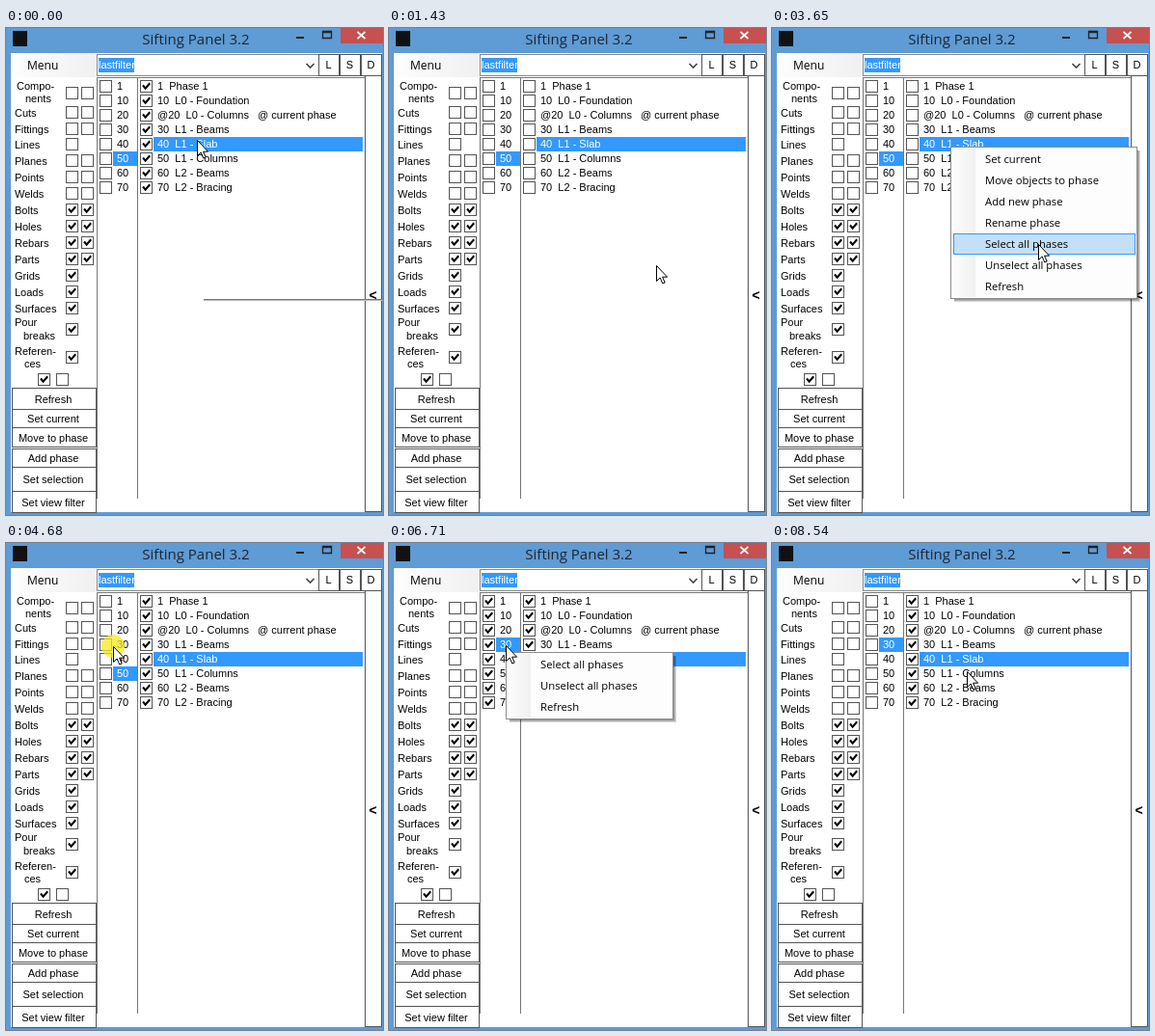
Write an HTML page that moves like this. It is 391 by 505 pixels and loops after 8.74 s.

```html
<!DOCTYPE html>
<html>
<head>
<meta charset="utf-8">
<style>
  html, body { margin: 0; width: 100%; height: 100%; overflow: hidden; background: #5f9bd4; }
  svg { display: block; }
  text { font: 11px "Liberation Sans", Arial, sans-serif; white-space: pre; }
  .ui { font: 11.3px "Open Sans", sans-serif; }
  .title { font: 15px "Open Sans", sans-serif; }
  .bold { font-weight: bold; font-size: 14px; }
  .mid { text-anchor: middle; }
  rect { shape-rendering: crispEdges; }
</style>
</head>
<body>
<svg width="391" height="505" viewBox="0 0 391 505"></svg>
<script>
const LOOP = 8740, STEPS = 43;
const BLUE = '#3399ff', LINE = '#555';
const svg = document.querySelector('svg');

const rect = (x, y, w, h, fill) => `<rect x="${x}" y="${y}" width="${w}" height="${h}" fill="${fill}"/>`;
const frame = (x, y, w, h, stroke = LINE, fill = '#fff') =>
  rect(x, y, w, h, stroke) + rect(x + 1, y + 1, w - 2, h - 2, fill);
const text = (x, y, s, cls = '', fill = '#000') => `<text x="${x}" y="${y}" class="${cls}" fill="${fill}">${s}</text>`;
const path = (d, stroke, width, fill = 'none') =>
  `<path d="${d}" stroke="${stroke}" stroke-width="${width}" fill="${fill}"/>`;
const check = (x, y, on) => frame(x, y, 13, 13) +
  (on ? path(`M${x + 3} ${y + 5.5}l2.6 3.2 4.6-5.4`, '#000', 2.1) : '');
const shade = `<defs><linearGradient id="shade"><stop stop-color="#fdfdfd"/>
  <stop offset="1" stop-color="#f0f0f0"/></linearGradient></defs>`;

const phases = ['1  Phase 1', '10  L0 - Foundation', '@20  L0 - Columns   @ current phase', '30  L1 - Beams',
  '40  L1 - Slab', '50  L1 - Columns', '60  L2 - Beams', '70  L2 - Bracing'];
const commands = ['Set current', 'Move objects to phase', 'Add new phase', 'Rename phase',
  'Select all phases', 'Unselect all phases', 'Refresh'];
const kinds = ['Cuts', 'Fittings', 'Lines', 'Planes', 'Points', 'Welds', 'Bolts', 'Holes', 'Rebars', 'Parts',
  'Grids', 'Loads', 'Surfaces'];
const buttons = [['Refresh', 373, 23], ['Set current', 395, 20], ['Move to phase', 414, 21],
  ['Add phase', 436, 20], ['Set selection', 455, 26], ['Set view filter', 480, 23]];

// Pointer positions: step, x, y
const pointer = [[0, 198, 116], [1, 198, 116], [5, 277, 246], [7, 277, 246], [11, 185, 116], [12, 185, 116],
  [14, 233, 157], [17, 276, 224], [18, 276, 224], [22, 114, 110], [23, 111, 107], [24, 111, 107],
  [26, 138, 137], [28, 138, 137], [31, 121, 106], [34, 121, 106], [37, 176, 146], [40, 176, 146], [42, 202, 133]];

// Context menus: first step, last step, x, y, width, item count
const menus = [[1, 6, 198, 123, 194, 7], [12, 17, 185, 123, 194, 7], [24, 27, 111, 115, 174, 3], [32, 38, 121, 113, 174, 3]];

const within = (k, a, b) => k >= a && k <= b;

function pointerAt(k) {
  const i = Math.max(1, pointer.findIndex(p => p[0] >= k));
  const [a, ax, ay] = pointer[i - 1], [b, bx, by] = pointer[i];
  const f = (k - a) / (b - a);
  return [Math.round(ax + (bx - ax) * f), Math.round(ay + (by - ay) * f)];
}

function drawWindow() {
  let s = shade + rect(0, 0, 391, 505, '#5f9bd4') + rect(7, 3, 15, 16, '#111');
  s += text(197, 17, 'Sifting Panel 3.2', 'title mid', '#1c2630');
  s += rect(301, 9, 8, 2, '#222') + path('M328.5 3.5h9v7h-9zM328 4.5h10', '#222', 1.3);
  s += rect(347, 0, 44, 16, '#c75050') + path('M364.5 4l8 7m0-7l-8 7', '#fff', 1.7);
  s += rect(5, 26, 385, 476, '#fff') + rect(6, 26, 88, 25, 'url(#shade)');
  s += text(22, 43, 'Menu', 'ui').replace('<text', '<text style="font-size:12px"');
  s += frame(94, 27, 231, 23, '#888') + rect(96, 31, 37, 15, BLUE) + text(96, 42, 'lastfilter', '', '#fff');
  s += path('M311.5 37l4 4 4-4', '#444', 1.6);
  [...'LSD'].forEach((c, i) => s += frame(324 + 22 * i, 27, 22, 23) + text(334.5 + 22 * i, 42, c, 'mid'));
  s += rect(94, 51, 278, 1, '#777');
  s += rect(94, 51, 1, 437, '#777') + rect(136, 51, 1, 437, '#777');
  s += frame(372, 49, 18, 453);
  return s + text(380.5, 282, '&lt;', 'bold mid');
}

function drawKinds() {
  let s = text(11, 64, 'Compo-') + text(20, 77, 'nents') + check(62, 61) + check(78, 61);
  kinds.forEach((name, i) => {
    const y = Math.floor(81.1 + 16.92 * i);
    s += text(9, y + 11, name) + check(62, y, i > 5);
    if (i < 10 && i !== 2) s += check(78, y, i > 5);
  });
  s += text(9, 309, 'Pour') + text(18, 323, 'breaks') + check(62, 306, true);
  s += text(9, 339, 'Referen-') + text(19, 352, 'ces') + check(62, 335, true);
  s += check(33, 358, true) + check(52, 358);
  for (const [name, y, h] of buttons) s += frame(6, y, 88, h) + text(49, Math.round(y + h / 2) + 4, name, 'mid');
  return s;
}

function drawPhases(k) {
  const selected = k < 24 ? 5 : 3;
  let s = rect(111, 53 + 15 * selected, 25, 15, BLUE) + rect(153, 113, 217, 15, BLUE);
  phases.forEach((name, i) => {
    const y = 64 + 15 * i;
    s += check(97, y - 10, within(k, 28, 38)) + check(139, y - 10, !within(k, 7, 17));
    s += text(115, y, i ? i * 10 : 1, '', i === selected ? '#fff' : '#000');
    s += text(157, y, name, '', i === 4 ? '#fff' : '#000');
  });
  return s;
}

function drawMenu([, , x, y, w, count], px, py) {
  const h = 22 * count + 4;
  let s = [3, 2, 1].map(d => rect(x + 4, y + 4, w - 4 + d, h - 4 + d, 'rgba(0,0,0,.16)')).join('');
  s += frame(x, y, w, h, '#8c8c8c', '#fdfdfd') + rect(x + 2, y + 2, 24, h - 4, 'url(#shade)');
  commands.slice(-count).forEach((name, i) => {
    const top = y + 2 + 22 * i;
    if (px >= x && py >= top && py < top + 22) s += frame(x + 3, top, w - 5, 22, BLUE, '#c4e0f8');
    s += text(x + 36, top + 15, name, 'ui');
  });
  return s;
}

function render(k) {
  const [x, y] = pointerAt(k);
  let s = drawWindow() + drawKinds() + drawPhases(k);
  if (k === 0) s += rect(205, 281, 186, 1, '#777') + rect(205, 282, 186, 1, '#bbb');
  for (const m of menus) if (within(k, m[0], m[1])) s += drawMenu(m, x, y);
  if (k === 23) s += '<circle cx="111" cy="107" r="12" fill="#f5ea20" opacity=".75"/>';
  s += path(`M${x + .5} ${y + .5}v16l3.7-3.5 2.6 6 2.4-1-2.6-5.8h5z`, '#000', 1, '#fff');
  svg.innerHTML = s;
}

let shown = -1;
function tick() {
  const t = performance.now() % LOOP;
  const k = Math.min(STEPS - 1, Math.floor((t + 5) * STEPS / LOOP));
  if (k !== shown) render(shown = k);
  requestAnimationFrame(tick);
}
tick();
</script>
</body>
</html>
```
